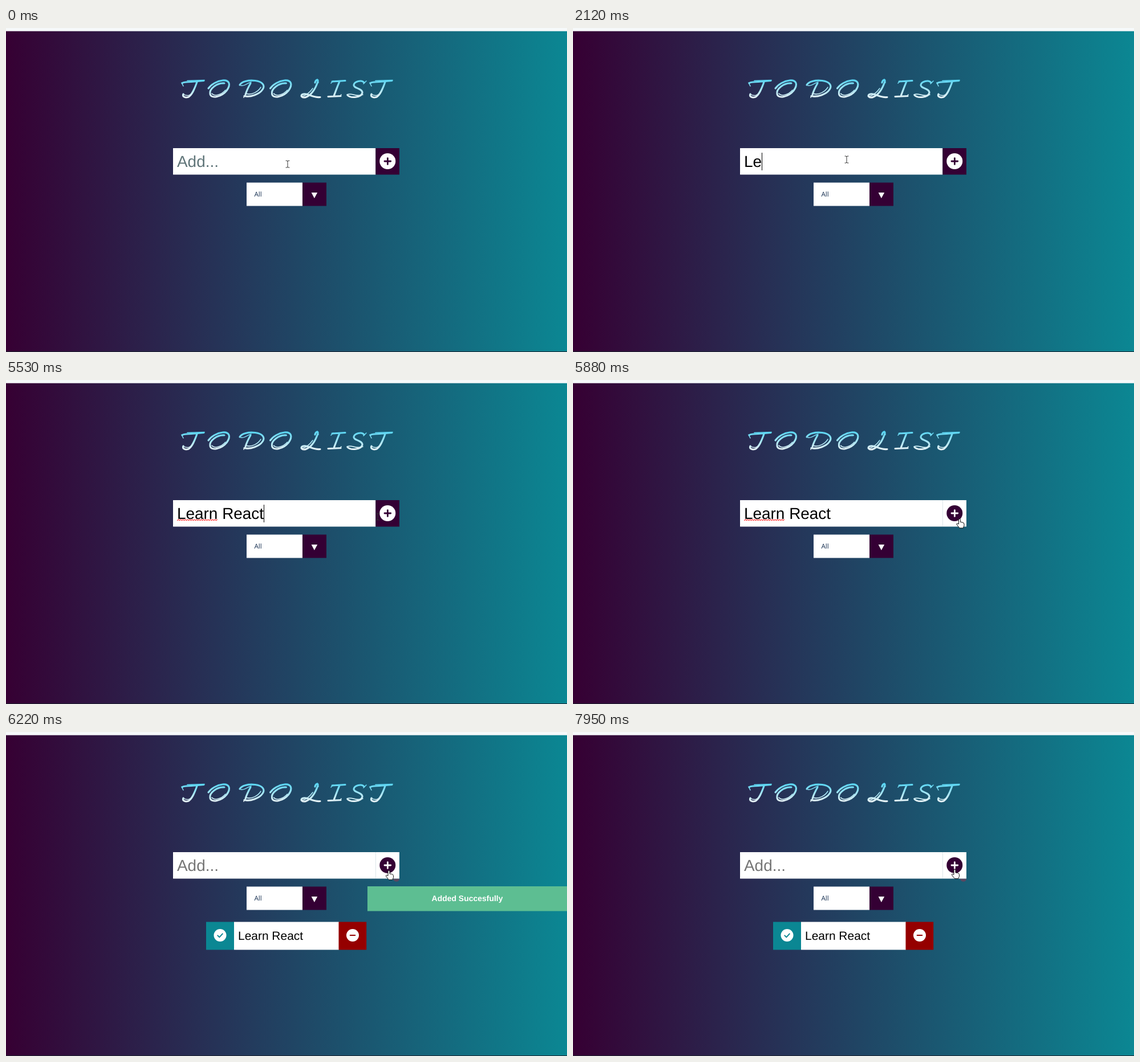
An HTML page that plays this animation: 984 px wide and 569 px high, repeating every 8 s.

```html
<!DOCTYPE html>
<html lang="en">
<head>
<meta charset="utf-8">
<title>Todo list</title>
<style>
  html, body { margin: 0; width: 100%; height: 100%; overflow: hidden; background: #20436a; }
  svg { display: block; width: 984px; height: 569px; }
  text { font-family: "Liberation Sans", Arial, sans-serif; white-space: pre; text-rendering: geometricPrecision; }
  .line { fill: none; stroke-linecap: round; stroke-linejoin: round; }
  .brush { stroke: url(#ink); stroke-width: 3.1; }
  .thin { stroke: url(#ink); stroke-width: 1.6; }
  #add { --plate: #340034; --mark: #fff; }
  #add.hover { --plate: #fff; --mark: #340034; }
  .plate { fill: var(--plate); }
  .mark { fill: var(--mark); }
  .plus { stroke: var(--plate); stroke-width: 2.8; }
</style>
</head>
<body>
<svg viewBox="0 0 984 569">
  <defs>
    <linearGradient id="page"><stop stop-color="#360033"/><stop offset="1" stop-color="#0b8793"/></linearGradient>
    <linearGradient id="ink" gradientUnits="userSpaceOnUse" x1="0" y1="89" x2="0" y2="124">
      <stop stop-color="#4fd3f2"/><stop offset="1" stop-color="#eef3f5"/>
    </linearGradient>
    <g id="T" class="line">
      <path class="brush" d="M309 97C312 94 318 95 325 94.5L347 92.5M335 95C331 106 326 119 319 121.5C313 123 309 120 311 116"/>
      <path class="thin" d="M308 96L311 102M311 116C316 120 322 119 327 114M318 92.5L348 91.5"/>
    </g>
    <g id="O" class="line">
      <path class="brush" d="M383 97C370 96 356 107 358 116C360 125 378 121 387 110C395 99 392 91 380 92C370 93 360 99 355 106"/>
      <path class="thin" d="M361 115C366 121 378 117 385 109M388 94C394 97 391 106 386 111"/>
    </g>
  </defs>

  <rect width="984" height="569" fill="url(#page)"/>
  <rect width="984" height="5.6" fill="#f6f9fa"/>
  <rect y="568" width="984" height="1" fill="#1d2430"/>

  <g role="img" aria-label="TODOLIST">
    <use href="#T"/>
    <use href="#O"/>
    <g class="line">
      <path class="brush" d="M410 100C413 94 425 91 437 92.5C450 94 455 101 450 108C445 116 429 122 418 119.5M429 97C425 104 422 110 420 117"/>
      <path class="thin" d="M412 101C418 103 422 97 430 95M421 115C431 119 443 111 447 104M418 119L417 122"/>
    </g>
    <use href="#O" x="108.5"/>
    <g class="line">
      <path class="brush" d="M542 96C543 91 548 89 547 94C543 106 536 117 527 121C520 124 515 119 520 116.5C529 113 537 123 551 121.5"/>
      <path class="thin" d="M546 90L548 96M518 120C525 120 533 113 538 106"/>
      <path class="brush" d="M572 94L595 92.5M585 94C581 103 578 112 575 119.5M565 120.5L587 119.5"/>
      <path class="thin" d="M570 97L574 93M586 120L588 117"/>
      <path class="brush" d="M628 96C624 90 611 94 610 100C609 106 626 106 625 114C623 122 605 124 599 118"/>
      <path class="thin" d="M632 93L627 98M598 117C607 113 613 122 626 117"/>
    </g>
    <use href="#T" x="330"/>
  </g>

  <rect x="293" y="211" width="355.5" height="46.5" fill="#fff"/>
  <path id="smudge" d="M679 257.5h11c0 7-10 7-11 0z" fill="#594760"/>
  <g id="add">
    <rect class="plate" x="648.3" y="211" width="41.7" height="46.5"/>
    <circle class="mark" cx="669.3" cy="234" r="14"/>
    <path class="line plus" d="M664 234h10.8M669.4 228.6v10.8"/>
  </g>
  <text id="field" x="300" y="244.3" font-size="27.92"></text>
  <path id="squiggle" class="line" stroke="#f22" stroke-width="1.1"/>
  <rect id="caret" y="219" width="1" height="31"/>

  <rect x="422" y="271.5" width="98" height="41" fill="#fff"/>
  <rect x="520" y="271.5" width="42" height="41" fill="#340034"/>
  <text x="435.5" y="296.3" font-size="11.63" fill="#102a4c" style="font-family:'Open Sans',sans-serif">All</text>
  <path d="M535.6 289h10.6l-5.3 10z" fill="#fff"/>

  <g id="task">
    <rect x="351" y="333.5" width="49" height="49" fill="#0b8793"/>
    <rect x="400" y="333.5" width="184" height="49" fill="#fff"/>
    <rect x="583.5" y="333.5" width="48.7" height="49" fill="#950000"/>
    <circle cx="375.5" cy="357" r="11" fill="#fff"/>
    <path class="line" d="M371.3 357.4l3 3 5.5-6" stroke="#0b8793" stroke-width="2"/>
    <circle cx="608" cy="357" r="11" fill="#fff"/>
    <path class="line" d="M603.7 357h8.6" stroke="#950000" stroke-width="2"/>
    <text x="407" y="364.6" font-size="20.94">Learn React</text>
  </g>

  <g id="toast">
    <rect x="634" y="271" width="350" height="43.5" fill="#5dbe92"/>
    <text x="809" y="297" font-size="13.96" font-weight="bold" text-anchor="middle" fill="#fff">Added Succesfully</text>
  </g>

  <circle id="press" r="8.5" fill="#d8c000" opacity=".64"/>
  <g id="pointer">
    <path id="beam" class="line" d="M-3-6h2l1 1 1-1h2M0-5V5M-3 6h2l1-1 1 1h2" stroke="#333" stroke-width="1"/>
    <path id="arrow" d="M0 0V14L3.3 11 5.5 16 7.6 15 5.5 10.3H10z" fill="#fff" stroke="#111" stroke-width=".9"/>
    <path id="hand" d="M-1.5 9V1.3a1.5 1.5 0 0 1 3 0V5.5L5 6q3 .5 3 3v3L6.3 16H0L-4.8 10q-1-2 1-2z" fill="#fff" stroke="#111" stroke-width="1"/>
  </g>
</svg>
<script>
const LOOP = 8000;
const $ = id => document.getElementById(id);
const show = (id, on) => $(id).setAttribute('visibility', on ? 'visible' : 'hidden');
const within = (t, from, to) => t >= from && t < to;

const typed = [
  [0, ''], [1920, 'L'], [2120, 'Le'], [2190, 'Lea'], [2390, 'Lear'], [3190, 'Learn'], [3320, 'Learn '],
  [3780, 'Learn R'], [4180, 'Learn Re'], [4330, 'Learn Rea'], [4590, 'Learn Reac'], [4990, 'Learn React'], [6220, '']
];
const caretOn = [[0, 0], [790, 1], [1320, 0], [1850, 1], [2920, 0], [3190, 1], [5600, 0]];
// time, shape, x, y
const moves = [
  [0, 'beam', 494, 239], [100, 'beam', 491, 237], [190, 'beam', 486, 234], [280, 'beam', 482, 232], [370, 'beam', 480, 231],
  [5390, 'beam', 502, 232], [5460, 'beam', 582, 236], [5530, 'beam', 652, 240], [5600, 'arrow', 702, 244],
  [5670, 'arrow', 711, 246], [5740, 'arrow', 702, 245], [5800, 'hand', 686, 244], [5870, 'hand', 678, 244],
  [5940, 'hand', 674, 243.5], [6010, 'hand', 671.5, 243.5], [7950, 'hand', 669.5, 241.5]
];
const latest = (steps, t) => steps.findLast(step => step[0] <= t);

let wave = 'M300.5 246.5';
for (let i = 0; i < 35; i++) wave += i % 2 ? 'l2 1.4' : 'l2-1.4';
$('squiggle').setAttribute('d', wave);

function draw(t) {
  const text = latest(typed, t)[1];
  const field = $('field');
  field.textContent = text || 'Add...';
  field.setAttribute('fill', text ? '#000' : t < 6220 ? '#607579' : '#757575');
  const width = text ? field.getComputedTextLength() : 0;
  $('caret').setAttribute('x', Math.floor(300 + width));
  show('caret', latest(caretOn, t)[1]);
  show('squiggle', within(t, 3320, 6150));

  const [, shape, x, y] = latest(moves, t);
  $('pointer').setAttribute('transform', `translate(${x} ${y})`);
  for (const id of ['beam', 'arrow', 'hand']) show(id, id === shape);

  const pressing = within(t, 6150, 6220);
  show('press', pressing || within(t, 790, 860));
  $('press').setAttribute('r', pressing ? 8.5 : 7);
  $('press').setAttribute('cx', pressing ? 671 : 480);
  $('press').setAttribute('cy', pressing ? 241.5 : 231);

  $('add').setAttribute('class', shape === 'hand' ? 'hover' : '');
  show('smudge', t >= 5940);
  show('task', t >= 6220);
  show('toast', within(t, 6220, 7210));
}

const start = performance.now();
function tick() {
  draw((performance.now() - start) % LOOP);
  requestAnimationFrame(tick);
}
tick();
</script>
</body>
</html>
```
